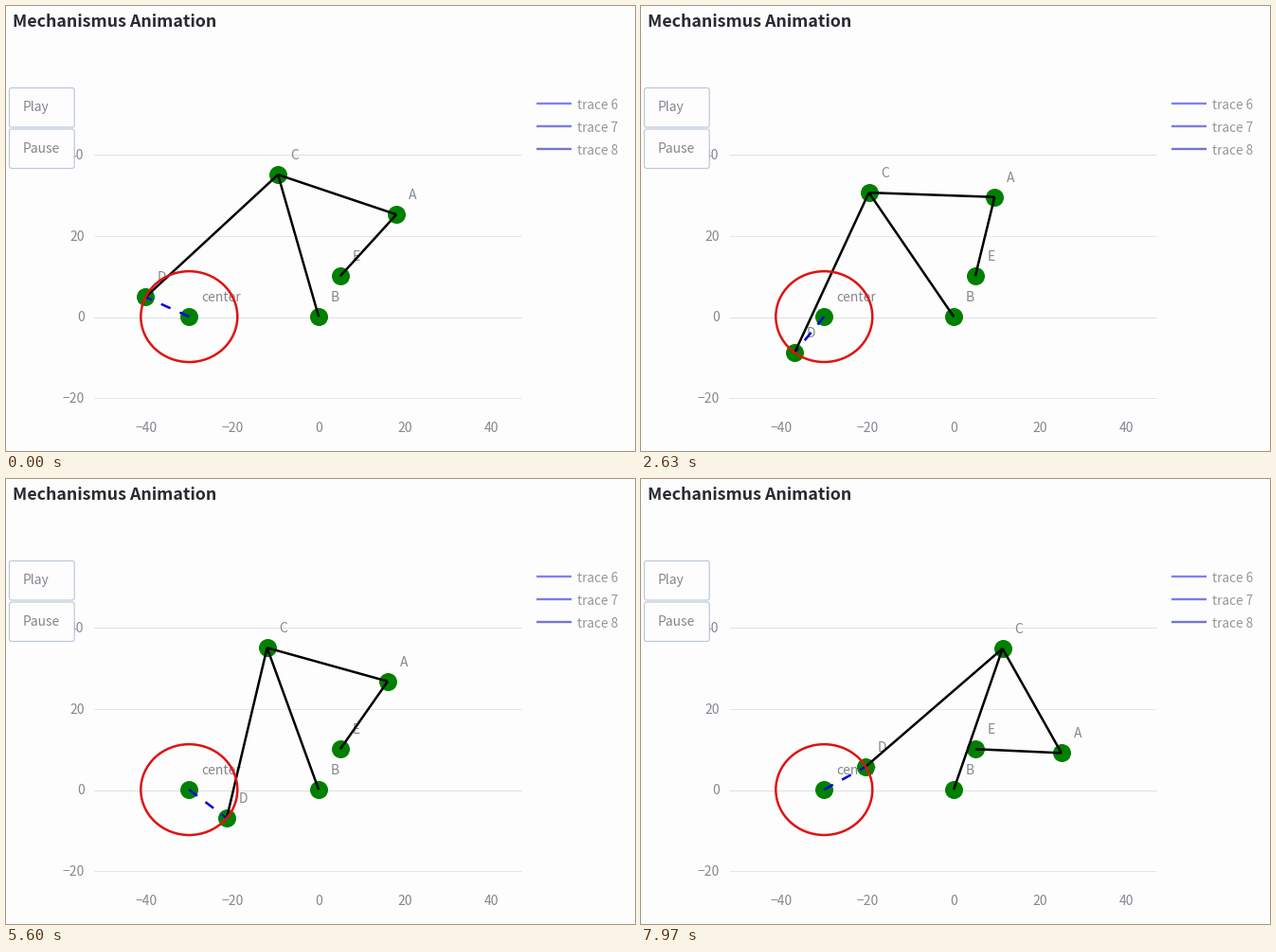
A matplotlib script for the animation above (8000 ms loop, 664 px wide and 470 px high).

```python
import numpy as np
import matplotlib.pyplot as plt
from matplotlib.animation import FuncAnimation
from matplotlib.patches import Ellipse, FancyBboxPatch

W, H, DPI = 664, 470, 100
FRAMES, LOOP = 240, 8000
PX = 72 / DPI
FONT = "Noto Sans CJK JP"
GREY, GREEN = "#86868f", "#008000"

ORIGIN = np.array([330.1, 328.1])
SCALE = np.array([4.56, -4.287])
B, E, CENTER = np.array([0.0, 0]), np.array([5.0, 10]), np.array([-30.0, 0])
CRANK, CD, CA, AE = np.sqrt(125), 43.0, 29.12, 19.97

# crank angle in degrees and length of rod BC at a few frames
KEYS = np.array([0, 45, 78, 107, 141, 192, 239])
ANGLE = np.array([154.4, 197.8, 232.4, 258.5, 294.4, 344.3, 390.5])
ROD = np.array([36.23, 36.31, 36.32, 36.36, 36.57, 37.13, 36.55])


def smooth(x, xs, ys):
    """Cubic Hermite curve through a few points."""
    slope = np.gradient(ys, xs)
    i = int(np.clip(np.searchsorted(xs, x, "right") - 1, 0, len(xs) - 2))
    h = xs[i + 1] - xs[i]
    u = (x - xs[i]) / h
    v = 1 - u
    return (v * v * (1 + 2 * u) * ys[i] + u * v * v * h * slope[i]
            + u * u * (3 - 2 * u) * ys[i + 1] - u * u * v * h * slope[i + 1])


def meet(p, rp, q, rq):
    """Joint of two rods from p and q, on the left of the way p to q."""
    d = np.hypot(*(q - p))
    u = (q - p) / d
    a = (rp ** 2 - rq ** 2 + d * d) / (2 * d)
    return p + a * u + np.sqrt(rp ** 2 - a * a) * np.array([-u[1], u[0]])


def joints(n):
    t = np.radians(smooth(n, KEYS, ANGLE))
    d = CENTER + CRANK * np.array([np.cos(t), np.sin(t)])
    c = meet(d, CD, B, smooth(n, KEYS, ROD))
    a = meet(c, CA, E, AE)
    pts = dict(A=a, B=B, C=c, D=d, E=E, center=CENTER)
    return {k: ORIGIN + SCALE * p for k, p in pts.items()}


fig = plt.figure(figsize=(W / DPI, H / DPI), dpi=DPI, facecolor="#fdfdfd")
ax = fig.add_axes([0, 0, 1, 1])
ax.set(xlim=(0, W), ylim=(H, 0))
ax.axis("off")


def write(x, y, s, size=13.9, color=GREY, **kw):
    return ax.text(x, y, s, fontsize=size * PX, color=color, family=FONT,
                   va="baseline", **kw)


def line(xs, ys, color, width, **kw):
    return ax.plot(xs, ys, color=color, lw=width * PX,
                   solid_capstyle="butt", dash_capstyle="butt", **kw)[0]


write(7, 22.5, "Mechanismus Animation", 17.85, "#2a2a32", weight="bold")

for v, color in ((-20, "#e4e4f8"), (0, "#e0e0e4"), (20, "#e6e6ec"), (40, "#e0e0e4")):
    y = ORIGIN[1] + SCALE[1] * v
    row = np.floor(y) + 0.5
    line([93, 544], [row, row], color, 1, zorder=1)
    write(82.5, y + 5.2, str(v).replace("-", "\u2212"), ha="right", zorder=1)
for v in range(-40, 41, 20):
    write(ORIGIN[0] + SCALE[0] * v, 449.5, str(v).replace("-", "\u2212"), ha="center")

for i, color in enumerate(("#8080fa", "#7c7ce4", "#7676cc")):
    y = 102.7 + 24 * i
    line([559.5, 597], [y, y], color, 2.4)
    write(603, y + 6.3, f"trace {6 + i}", 13.6, "#969698")

for y, s in ((86.5, "Play"), (130, "Pause")):
    ax.add_patch(FancyBboxPatch((3.5, y), 68.7, 41.5, boxstyle="round,pad=0,rounding_size=2.5",
                                fc="#fdfdfd", ec="#bcc8dc", lw=1.2 * PX, zorder=8))
    write(18, y + 24.7, s, zorder=9)

names = ("A", "B", "C", "D", "E", "center")
labels = {k: write(0, 0, k, zorder=2) for k in names}
dots = ax.plot([], [], "o", ms=19 * PX, color=GREEN, mew=0, zorder=3)[0]
crank = line([], [], "#0000dc", 2.5, zorder=4, dashes=(4.32, 4.32))
rods = [line([], [], "black", 2.5, zorder=5) for _ in range(4)]
links = ("DC", "CB", "CA", "AE")
ax.add_patch(Ellipse(ORIGIN + SCALE * CENTER, 2 * CRANK * SCALE[0], -2 * CRANK * SCALE[1],
                     fill=False, ec="#e01212", lw=2.5 * PX, zorder=6))


def draw(n):
    p = joints(n)
    for k, text in labels.items():
        text.set_position(p[k] + (12.8, -15.9))
    dots.set_data(*np.transpose([p[k] for k in names]))
    crank.set_data(*np.transpose([p["center"], p["D"]]))
    for rod, (s, e) in zip(rods, links):
        rod.set_data(*np.transpose([p[s], p[e]]))
    return [*labels.values(), dots, crank, *rods]


anim = FuncAnimation(fig, draw, frames=FRAMES, interval=LOOP / FRAMES, repeat=True)
plt.show()
```
